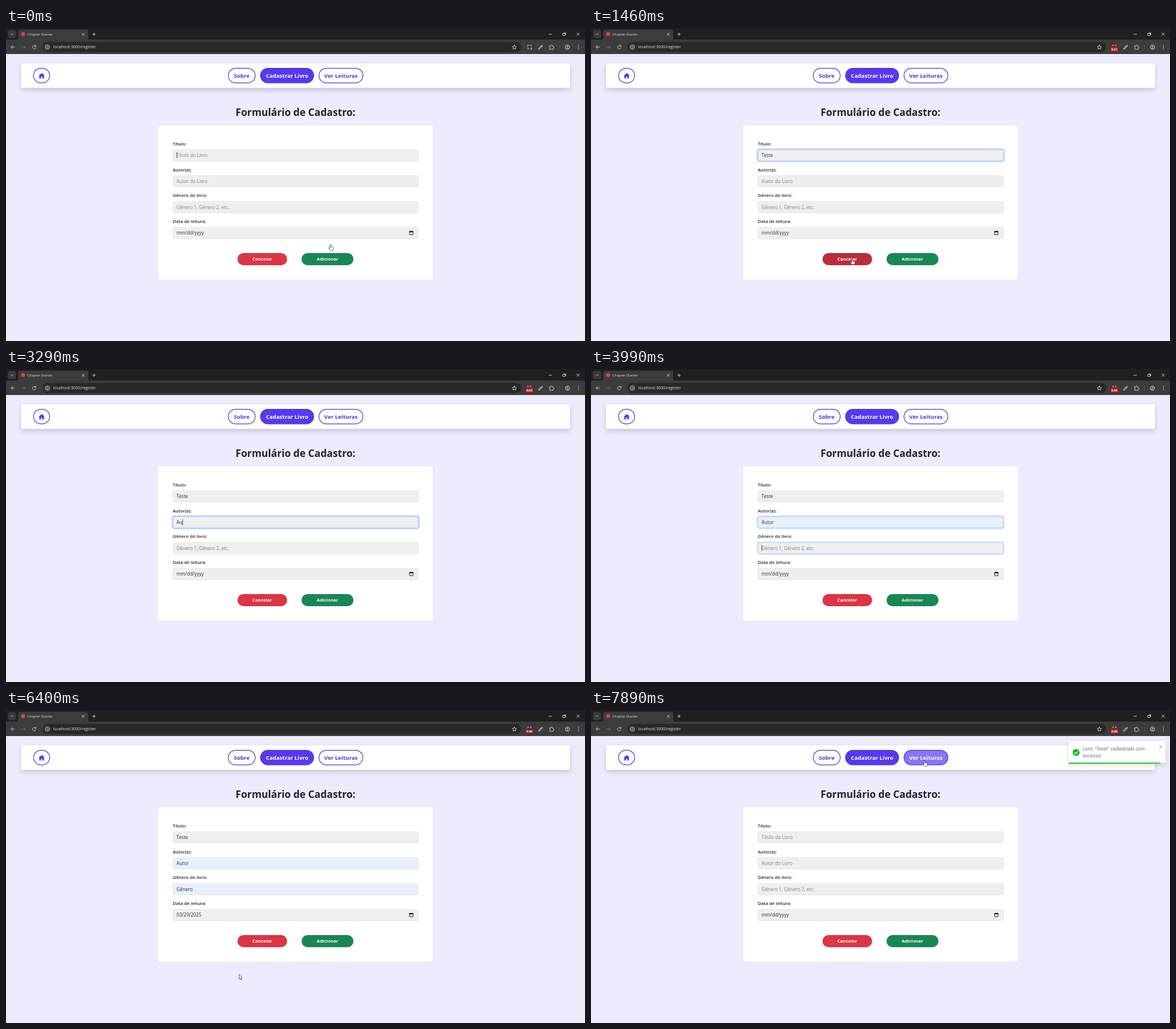
Recreate the animation shown at these times as an HTML page. Size 1000x541 px, loop 7.99 s.

```html
<!DOCTYPE html>
<html lang="pt">
<head>
<meta charset="utf-8">
<title>Cadastro</title>
<style>
html, body { margin: 0; width: 100%; height: 100%; overflow: hidden; background: #edebfe; }
svg { display: block; width: 100%; height: 100%; font-family: "Open Sans", "Noto Sans", sans-serif; }
.mid { text-anchor: middle; }
.nav { font-size: 9.6px; font-weight: 700; }
.btn { font-size: 7.8px; font-weight: 700; fill: #fff; }
.label { font-size: 7.75px; font-weight: 600; fill: #212529; }
.value { font-size: 8.08px; }
.line { fill: none; stroke: #d6d6d6; stroke-width: .9; stroke-linecap: round; stroke-linejoin: round; }
.lift { filter: drop-shadow(0 4px 4.2px rgba(0, 0, 0, .16)); }
.toast { font: 8.33px "Liberation Sans", Arial, sans-serif; fill: #757575; }
</style>
</head>
<body>
<svg id="stage" viewBox="0 0 1000 541" xmlns="http://www.w3.org/2000/svg"></svg>
<script>
const LOOP = 7990;
const stage = document.getElementById('stage');
const get = id => document.getElementById(id);

const rect = (x, y, w, h, r, fill, more = '') =>
  `<rect x="${x}" y="${y}" width="${w}" height="${h}" rx="${r}" fill="${fill}" ${more}/>`;
const text = (x, y, cls, str, more = '') => `<text x="${x}" y="${y}" class="${cls}" ${more}>${str}</text>`;
const line = (d, more = '') => `<path class="line" d="${d}" ${more}/>`;

const PURPLE = '#5639f1';

const browser = `
  ${rect(0, 0, 1000, 21, 0, '#1f1f1f')}
  ${rect(0, 20, 1000, 25, 0, '#3c3c3c')}
  ${rect(3.5, 3.5, 14, 14, 4, '#3a3a3a')}
  ${line('M8.5 9.8l2 2 2-2')}
  <path d="M17 20.5q4 0 4-4V7q0-4 4-4H138q4 0 4 4v9.500q0 4 4 4z" fill="#3c3c3c"/>
  <circle cx="29.500" cy="10.500" r="3.400" fill="#d8434b"/>
  ${text(37, 13, '', 'Chapter Diaries', 'font-size="6" fill="#e3e3e3"')}
  ${line('M131.300 8.800l4 4m0-4l-4 4M149.500 10.800h5m-2.500-2.500v5')}
  ${line('M937.500 10.800h5M962 9.500h3.500v3.500h-3.500zM963.500 8.300h3.300v3.300M985.800 8.300l4.600 4.600m0-4.600l-4.600 4.600')}
  ${line('M14.800 33H8.800m2.700-2.700L8.800 33l2.700 2.700')}
  ${line('M27.200 33h6m-2.700-2.700l2.700 2.700-2.700 2.700', 'style="stroke:#777"')}
  ${line('M51.300 31.200a3 3 0 1 0 .5 2.600M51.800 29.700v2h-2')}
  ${rect(63, 24, 827, 17.500, 8.700, '#282828')}
  <circle cx="71.400" cy="33" r="6.300" fill="#3a3a3a"/>
  <circle class="line" cx="71.400" cy="33" r="3.300"/>
  ${line('M71.400 32.800v1.700m0-3.300v.1')}
  ${text(81.5, 35.4, '', 'localhost:3000/register', 'font-size="6.930" fill="#e3e3e3"')}
  ${line('M878 29.400l1.100 2.400 2.600.3-1.900 1.800.5 2.600-2.300-1.300-2.300 1.300.5-2.600-1.900-1.800 2.600-.3z')}
  <g id="capture">
    ${line('M901 31.500v-1.700h2m2.300 0h2v1.700m0 2.500v.5M901 34v2h2m3.500 0h1.500m-.700-.8v1.600')}
  </g>
  <g id="badge">
    ${line('M901 31v-1.500h1.700m2.300 0h1.700v1.500')}
    ${rect(897.5, 32.7, 13, 7.8, 1.5, '#c9131c', 'id="badgeBox"')}
    ${text(904, 38.6, 'mid', '', 'id="badgeText" font-size="5.200" font-weight="700" fill="#fff"')}
  </g>
  ${line('M920 36.300l.4-1.700 3-3 1.300 1.300-3 3zM923.700 31.300l1.800-1.800 1.300 1.300-1.800 1.800z', 'style="stroke:#fff"')}
  ${line('M939 31h2v-.6a1 1 0 0 1 2 0v.6h2v2h.500a1 1 0 0 1 0 2H945v1.800h-6v-1.900a1 1 0 0 0 0-2z')}
  ${rect(955.5, 29, 1, 8, 0, '#5a5a5a')}
  <circle class="line" cx="969.700" cy="33" r="3.700"/>
  <circle class="line" cx="969.700" cy="32" r="1.100"/>
  ${line('M967.500 35.400q2.200-1.500 4.400 0')}
  ${[30, 33, 36].map(y => `<circle cx="988.800" cy="${y}" r=".8" fill="#ddd"/>`).join('')}`;

const pill = (x, w, label, solid, id = '') =>
  rect(x + .6, 69.6, w - 1.2, 25.2, 12.6, solid ? PURPLE : '#fff', `stroke="#5037d6" stroke-width="1.200" id="${id}Box"`) +
  text(x + w / 2, 85.9, 'nav mid', label, `fill="${solid ? '#fff' : '#5037d6'}" id="${id}Text"`);

const nav = `
  ${rect(26, 61, 948, 42.5, 3, '#fff', 'class="lift"')}
  ${pill(47, 29, '', false, 'home')}
  <path d="M56.200 82.800l5.300-4.900 1.800 1.600v-1h1.300v2.300l2.100 2h-1.200v4.400h-2.900v-3h-2.200v3h-2.900v-4.400z" fill="${PURPLE}"/>
  ${pill(383.300, 47.7, 'Sobre', false, 'about')}
  ${pill(439, 93, 'Cadastrar Livro', true, 'add')}
  ${pill(540, 77, 'Ver Leituras', false, 'list')}`;

const FIELDS = [
  ['Título:', 'Título do Livro', 210],
  ['Autor(a):', 'Autor do Livro', 254.8],
  ['Gênero do livro:', 'Gênero 1, Gênero 2, etc.', 299.6],
  ['Data de leitura:', 'mm/dd/yyyy', 344.3],
];

const field = ([label, , y], i) => `
  ${text(288, y - 7.2, 'label', label)}
  ${rect(287, y - 1, 426.5, 22, 4, 'none', `stroke="#0d6efd" stroke-width="2.200" id="ring${i}"`)}
  ${rect(288.3, y + .3, 424, 19.6, 3, '#efefef', `stroke="#dee0e4" stroke-width=".7" id="box${i}"`)}
  ${text(294.6, y + 13.1, 'value', '', `id="value${i}"`)}`;

const form = `
  ${text(500, 151.7, 'mid', 'Formulário de Cadastro:', 'font-size="17.200" font-weight="700" fill="#212529"')}
  ${rect(263, 168.5, 474, 266.5, 3, '#fff')}
  ${FIELDS.map(field).join('')}
  ${rect(0, 0, .7, 10.5, 0, '#111', 'id="caret"')}
  <path d="M697 351.500h6v5.800h-6zM698.300 350.500v1m3.400-1v1" fill="none" stroke="#111" stroke-width=".9"/>
  ${rect(696.7, 351.2, 6.6, 1.9, 0, '#111')}
  ${rect(399.8, 389, 85.7, 21, 10.5, '#dc3545', 'id="cancel"')}
  ${text(442.5, 402.4, 'btn mid', 'Cancelar')}
  ${rect(510.4, 389, 89.700, 21, 10.5, '#198754', 'id="submit"')}
  ${text(555.2, 402.4, 'btn mid', 'Adicionar')}`;

const toast = `
  <g id="toast">
    ${rect(825, 53.500, 167.5, 39.7, 2, '#fff', 'style="filter:drop-shadow(0 2px 3px rgba(0,0,0,.14))"')}
    <circle cx="838" cy="73.300" r="5.900" fill="#07bc0c"/>
    <path d="M835.300 73.500l2 2 3.600-4.100" fill="none" stroke="#fff" stroke-width="1.400"/>
    ${text(849, 69.900, 'toast', 'Livro "Teste" cadastrado com')}
    ${text(849, 82.300, 'toast', 'sucesso!')}
    <path d="M982 61.200l4.600 4.600m0-4.600l-4.600 4.600" stroke="#8a8a8a" stroke-width="1"/>
    ${rect(825, 90.6, 167.5, 2.6, 0, '#cdf2ce')}
    ${rect(825, 90.6, 167.5, 2.6, 0, '#51c955', 'id="progress"')}
  </g>`;

const cursor = `
  <g id="cursor" fill="#fff" stroke="#222" stroke-width=".7" stroke-linejoin="round">
    <path id="arrow" d="M0 0v8.300l1.900-1.700 1.300 2.800 1.300-.6-1.300-2.700h2.600z"/>
    <path id="hand" d="M-.9.700q.9-1.300 1.800 0v3.500l3.200.7q1.200.300 1 1.500l-.6 3q-.2 1-1.200 1h-3q-.7 0-1.200-.7l-2.400-3.400q.7-1.200 1.700-.2l.7.700z"/>
    <path id="beam" d="M-1.500-4h3M0-4v8M-1.500 4h3" fill="none"/>
  </g>`;

stage.innerHTML = rect(0, 0, 1000, 541, 0, '#edebfe') + browser + nav + form + toast + cursor;

// time, focused field (-1 for none)
const FOCUS = [[0, 0], [2790, 1], [3930, 2], [5330, -1]];
// time, field, text, filled in by the browser
const VALUES = [
  [700, 0, 'T'], [760, 0, 'Te'], [810, 0, 'Tes'], [860, 0, 'Test'], [900, 0, 'Teste'],
  [2990, 1, 'A'], [3290, 1, 'Au'], [3810, 1, 'Autor', true],
  [4410, 2, 'G'], [4510, 2, 'Gênero', true],
  [5830, 3, '03/29/2025'],
  ...FIELDS.map((_, i) => [7210, i, '']),
];
// time, x, y, pointer shape until the next step
const PATH = [
  [0, 560.5, 374, 'hand'], [490, 560.5, 374, ''],
  [1260, 500, 412, 'arrow'], [1410, 451, 398.500, 'arrow'], [1800, 451, 398.500, 'arrow'],
  [2040, 430, 222, ''],
  [4720, 640, 420, 'arrow'], [5090, 714.500, 354.500, 'arrow'], [5250, 700, 354, 'arrow'],
  [5420, 700, 354, 'arrow'], [5740, 402.500, 457, 'arrow'], [6400, 402.500, 457, 'arrow'],
  [6800, 556, 400, 'arrow'], [7230, 556, 400, 'arrow'], [7650, 576, 87, 'arrow'], [LOOP, 576, 87, ''],
];
const TICKS = [190, 1000, 2000, 2900, 3900, 4900, 5830, 6830, 7810];
const TOAST_AT = 7210;
const BOUNCE = [[0, 1560], [.6, -13], [.75, 5.2], [.9, -2.6], [1, 0]];

const EVENTS = [...FOCUS, ...VALUES].map(e => e[0]);
const clamp = v => Math.max(0, Math.min(1, v));
const smooth = u => u * u * (3 - 2 * u);
const easeOut = u => 1 - (1 - u) ** 3;
const set = (id, attrs) => { for (const k in attrs) get(id).setAttribute(k, attrs[k]); };
const show = (id, on) => set(id, { visibility: on ? 'visible' : 'hidden' });
const stepAt = (list, t) => list.findLastIndex(s => s[0] <= t);

function along(list, t, k, ease) {
  const i = stepAt(list, t), a = list[i], b = list[i + 1];
  return b ? a[k] + (b[k] - a[k]) * ease((t - a[0]) / (b[0] - a[0])) : a[k];
}

function ringAt(i, t) {
  const n = stepAt(FOCUS, t), u = clamp((t - FOCUS[n][0]) / 150);
  if (FOCUS[n][1] === i) return u;
  return n > 0 && FOCUS[n - 1][1] === i ? 1 - u : 0;
}

function drawFields(t) {
  FIELDS.forEach(([, hint], i) => {
    const [, , str = '', filled] = VALUES.findLast(v => v[1] === i && v[0] <= t) || [];
    const ring = ringAt(i, t);
    get('value' + i).textContent = str || hint;
    set('value' + i, { fill: str || i === 3 ? '#2b2f33' : '#7c7f84' });
    set('ring' + i, { 'stroke-opacity': .25 * ring });
    set('box' + i, { fill: filled ? '#e8f0fe' : '#efefef', stroke: ring > .3 ? '#86b7fe' : '#dee0e4' });
  });
  const active = FOCUS[stepAt(FOCUS, t)][1];
  const since = t - Math.max(...EVENTS.filter(e => e <= t));
  show('caret', active >= 0 && Math.floor(since / 530) % 2 === 0);
  if (active < 0) return;
  const typed = VALUES.some(v => v[1] === active && v[0] <= t);
  const width = typed ? get('value' + active).getComputedTextLength() : 0;
  set('caret', { x: 294.6 + width, y: FIELDS[active][2] + 4.7 });
}

function drawCursor(t) {
  const x = along(PATH, t, 1, smooth), y = along(PATH, t, 2, smooth);
  let kind = PATH[stepAt(PATH, t)][3];
  const over = (x0, x1, y0, y1) => kind !== '' && x > x0 && x < x1 && y > y0 && y < y1;
  const cancel = over(400, 485, 389, 410), submit = over(511, 600, 389, 410), list = over(540, 617, 69, 95);
  if (cancel || submit || list) kind = 'hand';
  else if (FIELDS.some(f => over(288, 690, f[2], f[2] + 20))) kind = 'beam';
  for (const k of ['arrow', 'hand', 'beam']) show(k, k === kind);
  set('cursor', { transform: `translate(${x} ${y})` });
  set('cancel', { fill: cancel ? '#bb2d3b' : '#dc3545' });
  set('submit', { fill: submit ? '#157347' : '#198754' });
  set('listBox', { fill: list ? '#8a74f9' : '#fff' });
  set('listText', { fill: list ? '#fff' : '#5037d6' });
}

function drawBadge(t) {
  const n = TICKS.findLastIndex(s => s <= t);
  show('capture', n < 0);
  show('badge', n >= 0);
  get('badgeText').textContent = '0:0' + Math.max(n, 0);
  set('badgeBox', { fill: n % 4 === 2 ? '#8c1c1f' : '#c9131c' });
}

function drawToast(t) {
  const age = t - TOAST_AT;
  show('toast', age >= 0);
  if (age < 0) return;
  set('toast', { transform: `translate(${along(BOUNCE, clamp(age / 700), 1, easeOut)} 0)` });
  set('progress', { width: 167.5 * (1 - age / 12600) });
}

const start = performance.now();
function frame() {
  const t = (performance.now() - start) % LOOP;
  drawFields(t);
  drawCursor(t);
  drawBadge(t);
  drawToast(t);
  requestAnimationFrame(frame);
}
frame();
</script>
</body>
</html>
```
